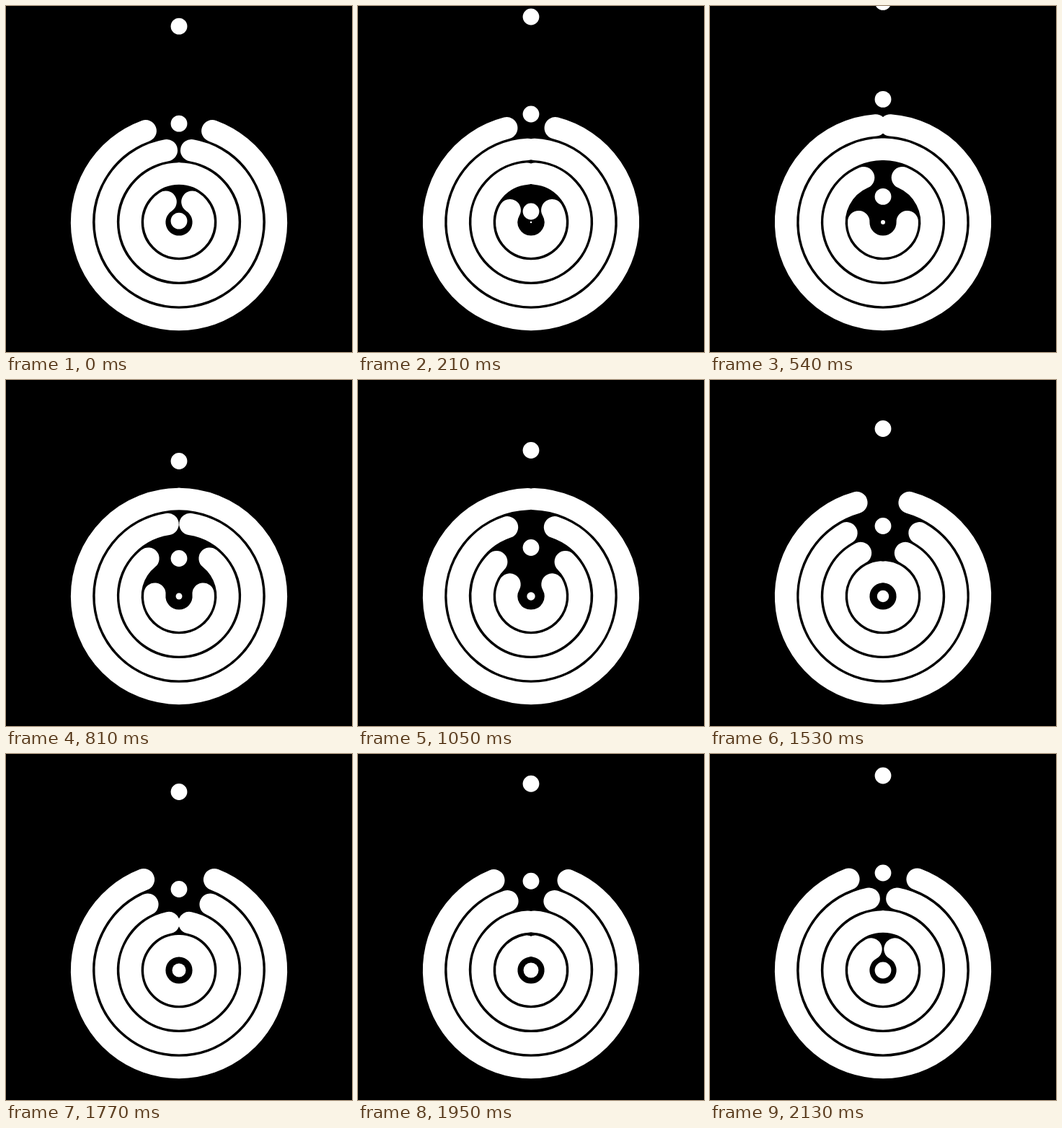
An HTML page that plays this animation: 480 px wide and 480 px high, repeating every 2.16 s.

```html
<!DOCTYPE html>
<html lang="en">
<head>
<meta charset="utf-8">
<title>Rings and rising dots</title>
<style>
  html, body { margin: 0; width: 100%; height: 100%; overflow: hidden; background: #000; }
  svg { display: block; width: 100%; height: 100%; }
  path { fill: none; stroke: #fff; stroke-width: 30.3; stroke-linecap: round; }
  circle { fill: #fff; }
</style>
</head>
<body>
<svg id="stage" viewBox="0 0 480 480"></svg>
<script>
const LOOP = 2160, STEP = 30;
const CX = 240, CY = 300;
const PITCH = 33.75, RISE = 4 * PITCH, DOT = 11.4;

const stage = document.getElementById('stage');
const add = tag => stage.appendChild(
  document.createElementNS('http://www.w3.org/2000/svg', tag));

const rings = [1, 2, 3, 4].map(n => ({ n, node: add('path') }));
const dots = [0, 1, 2].map(() => add('circle'));
const seed = add('circle');

function setDot(node, y, r) {
  node.setAttribute('cx', CX);
  node.setAttribute('cy', y);
  node.setAttribute('r', r);
}

// Each ring opens at the top by up to 90/n degrees per side, one after another.
function gapAngle(n, u) {
  const phase = 2 * Math.PI * (u - 0.107 - 0.2 * n);
  return Math.PI / 2 / n * (1 + Math.cos(phase)) / 2;
}

function ringPath(n, u) {
  const r = n * PITCH;
  const a = Math.max(gapAngle(n, u), 0.002);
  const dx = r * Math.sin(a), y = CY - r * Math.cos(a);
  return `M${CX + dx} ${y}A${r} ${r} 0 0 1 ${CX} ${CY + r}` +
         `A${r} ${r} 0 0 1 ${CX - dx} ${y}`;
}

function draw(time) {
  const tick = Math.floor((time % LOOP) / STEP) * STEP;
  // Progress runs over (0, 1], so the loop ends with the seed fully grown.
  const u = (tick + STEP) / LOOP;
  const shift = u % 1;
  rings.forEach(({ n, node }) => node.setAttribute('d', ringPath(n, u)));
  dots.forEach((node, k) => setDot(node, CY - RISE * (shift + k), DOT));
  setDot(seed, CY, DOT * shift);
}

const start = performance.now();
function loop() {
  draw(performance.now() - start);
  requestAnimationFrame(loop);
}
loop();
</script>
</body>
</html>
```
